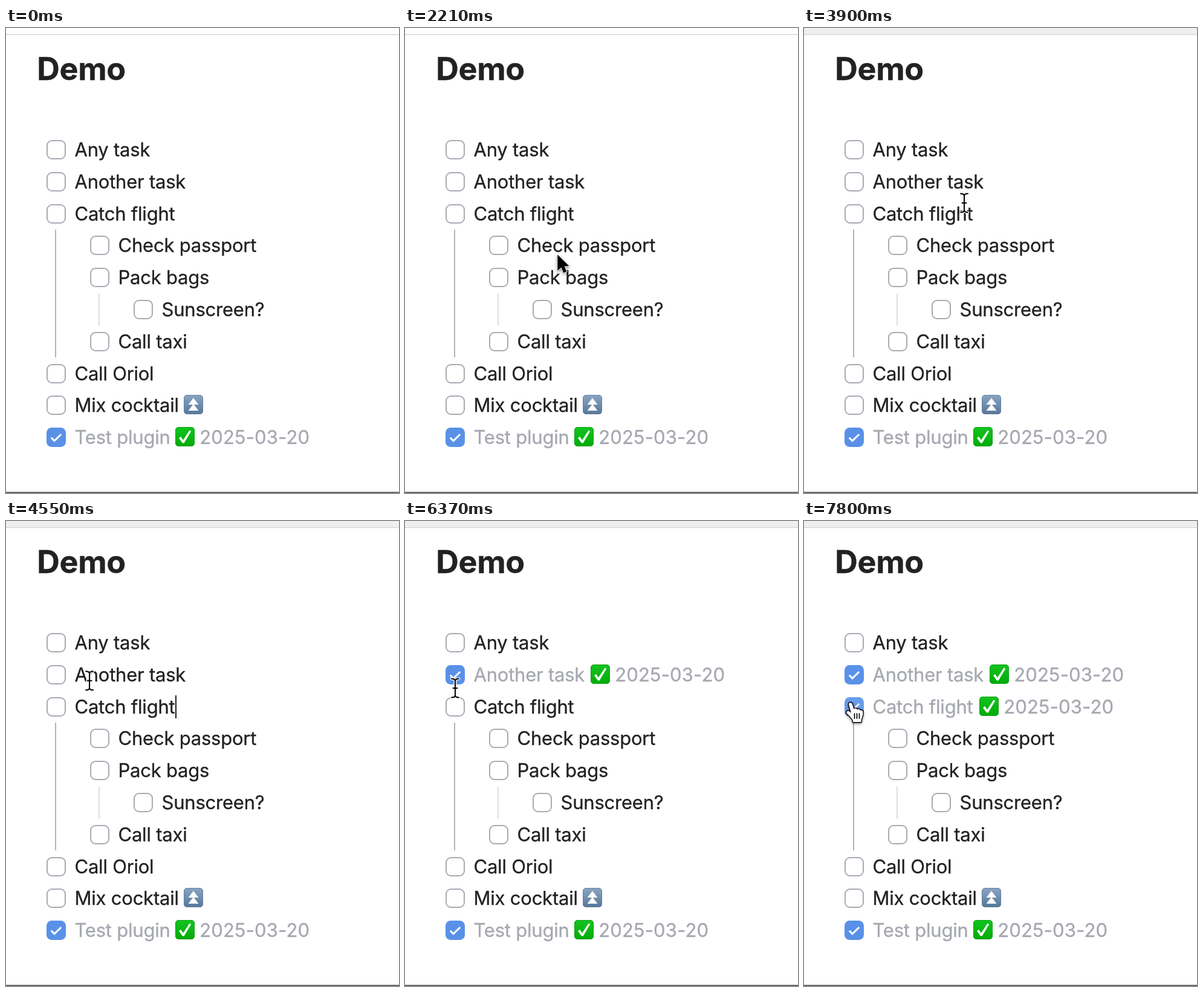
These frames come from a looping animation (650 px wide and 768 px high, 8000 ms). An HTML page with a canvas:

```html
<!DOCTYPE html>
<html lang="en">
<head>
<meta charset="utf-8">
<title>Demo</title>
<style>
  html, body { margin: 0; width: 100%; height: 100%; overflow: hidden; background: #fff; }
  canvas { display: block; width: 650px; height: 768px; }
</style>
</head>
<body>
<canvas id="stage" width="650" height="768"></canvas>
<script>
const ctx = document.getElementById('stage').getContext('2d');
const LOOP = 8000, STEP = 130;
const FONT = 'Inter, "Liberation Sans", sans-serif';
const INK = '#222222', MUTED = '#a6a8b1', EDGE = '#a9abb4', EDGE_HOVER = '#5c5c5c';
const BLUE = '#5991e8', BLUE_HOVER = '#689ceb';
const FOCUS_AT = 3380, DATE = '2025-03-20';

// icon: x of the emoji that follows the label; done: time of completion
const tasks = [
  { text: 'Any task', level: 0 },
  { text: 'Another task', level: 0, done: 5850, icon: 307 },
  { text: 'Catch flight', level: 0, done: 6890, icon: 290 },
  { text: 'Check passport', level: 1 },
  { text: 'Pack bags', level: 1 },
  { text: 'Sunscreen?', level: 2 },
  { text: 'Call taxi', level: 1 },
  { text: 'Call Oriol', level: 0 },
  { text: 'Mix cocktail', level: 0, urgent: 294 },
  { text: 'Test plugin', level: 0, done: 0, icon: 280 }
];
tasks.forEach((task, i) => {
  task.x = 67 + 72 * task.level;
  task.y = Math.round(185 + 52.8 * i);
});

// time, x, y of the pointer hot spot
const path = [
  [1300, 192, 428], [1560, 209, 396], [2080, 246, 372], [2730, 297, 379],
  [3380, 268, 296], [3770, 268, 296], [3900, 265, 289], [4160, 284, 303],
  [4290, 284, 303], [4680, 87, 250], [6110, 87, 250], [6370, 83, 276],
  [6630, 77, 300], [8000, 77, 300]
];

const caretSpans = [[4290, 4940], [5460, 6110], [6630, 6890]];

const handShape = new Path2D('M5 4C5 0 10.5 0 11 4L13.5 12C14 10 18.5 10 19 13C20 11 23.5 11.5 24 14' +
  'C25.5 12.5 28.5 14 28.5 17C28.8 22 27 25 26 28L25.5 33L12 33L11.5 29.5C9 26 6 22.5 2 19' +
  'C0 16.5 3 13.5 6 15.5L9 18Z');
const handLines = new Path2D('M14.5 19V27M18.5 19V27M22.5 19V27');
const arrowShape = new Path2D('M1 1.5V28L7.2 22.4L11 31.5L16 29.4L12.2 20.8L20 20.3Z');
const beamShape = new Path2D('M-6-15.5C-3-15.5 0-14.5 0-11.5C0-14.5 3-15.5 6-15.5' +
  'M0-12V12M-6 15.5C-3 15.5 0 14.5 0 11.5C0 14.5 3 15.5 6 15.5M-3.5 0H3.5');
const tickShape = new Path2D('M6 18.2L9 15.8L13 21.4L23.6 5.4L26.2 7L14.6 26.6H12Z');

function pointerAt(t) {
  if (t < path[0][0]) return null;
  const i = path.findIndex(k => k[0] > t);
  const a = path[i - 1], b = path[i];
  const p = (t - a[0]) / (b[0] - a[0]);
  const e = p * p * (3 - 2 * p);
  return { x: a[1] + (b[1] - a[1]) * e, y: a[2] + (b[2] - a[2]) * e };
}

// A hairline stroke gives the slightly heavier screen weight
function write(text, x, baseline, color, { size = 31, weight = 400, spacing = -0.22 } = {}) {
  ctx.font = `${weight} ${size}px ${FONT}`;
  ctx.letterSpacing = spacing + 'px';
  ctx.fillStyle = ctx.strokeStyle = color;
  ctx.lineWidth = 0.35;
  ctx.fillText(text, x, baseline);
  ctx.strokeText(text, x, baseline);
}

function rect(x, y, w, h, color) {
  ctx.fillStyle = color;
  ctx.fillRect(x, y, w, h);
}

function rounded(x, y, w, h, r) {
  ctx.beginPath();
  ctx.roundRect(x, y, w, h, r);
}

function line(points, width, color) {
  ctx.beginPath();
  points.forEach(([x, y]) => ctx.lineTo(x, y));
  ctx.lineWidth = width;
  ctx.strokeStyle = color;
  ctx.stroke();
}

function tile(x, y, top, bottom, edge) {
  const g = ctx.createLinearGradient(0, y, 0, y + 32);
  g.addColorStop(0, top);
  g.addColorStop(1, bottom);
  rounded(x + 0.5, y + 0.5, 31, 31, 4.5);
  ctx.fillStyle = g;
  ctx.fill();
  ctx.lineWidth = 1;
  ctx.strokeStyle = edge;
  ctx.stroke();
}

function doneIcon(x, y) {
  tile(x, y, '#14c41f', '#00ab08', '#0da017');
  ctx.save();
  ctx.translate(x, y);
  ctx.fillStyle = '#fff';
  ctx.fill(tickShape);
  ctx.restore();
}

function urgentIcon(x, y) {
  tile(x, y, '#8ba5c2', '#56779b', '#64809f');
  ctx.fillStyle = '#fff';
  for (const top of [5, 15]) {
    ctx.beginPath();
    ctx.moveTo(x + 16, y + top);
    ctx.lineTo(x + 24.5, y + top + 11);
    ctx.lineTo(x + 7.5, y + top + 11);
    ctx.fill();
  }
}

function checkbox(x, y, done, hover) {
  if (done) {
    rounded(x, y, 32, 32, 8.5);
    ctx.fillStyle = hover ? BLUE_HOVER : BLUE;
    ctx.fill();
    line([[x + 7.8, y + 16.6], [x + 13, y + 21.8], [x + 24.2, y + 11]], 3, '#fff');
  } else {
    rounded(x + 1, y + 1, 30, 30, 8);
    ctx.lineWidth = 2;
    ctx.strokeStyle = hover ? EDGE_HOVER : EDGE;
    ctx.stroke();
  }
}

function outlined(shape, inner, outer, width) {
  ctx.strokeStyle = outer;
  ctx.lineWidth = width;
  ctx.stroke(shape);
  ctx.fillStyle = inner;
  ctx.fill(shape);
}

function drawPointer(p, kind) {
  ctx.save();
  ctx.lineJoin = ctx.lineCap = 'round';
  if (kind === 'beam') {
    ctx.translate(p.x, p.y);
    for (const [width, color] of [[4.5, '#fff'], [2, '#000']]) {
      ctx.lineWidth = width;
      ctx.strokeStyle = color;
      ctx.stroke(beamShape);
    }
  } else {
    ctx.shadowColor = 'rgba(0,0,0,.3)';
    ctx.shadowBlur = 4;
    ctx.shadowOffsetY = 2;
    if (kind === 'hand') {
      ctx.translate(p.x - 8, p.y - 1);
      outlined(handShape, '#fff', '#000', 2.8);
      ctx.shadowColor = 'transparent';
      ctx.lineWidth = 1.7;
      ctx.stroke(handLines);
    } else {
      ctx.translate(p.x, p.y);
      outlined(arrowShape, '#fff', '#fff', 2.4);
      ctx.shadowColor = 'transparent';
      ctx.fillStyle = '#000';
      ctx.fill(arrowShape);
    }
  }
  ctx.restore();
}

function draw(t) {
  rect(0, 0, 650, 768, '#fff');
  if (t >= FOCUS_AT) rect(0, 0, 650, 10, '#efefef');
  rect(0, 10, 650, 1.5, '#d8d8d8');
  rect(0, 766, 650, 2, '#6c6c6c');
  write('Demo', 51.3, 86, INK, { size: 52, weight: 700, spacing: -0.35 });

  rect(81, 333, 2, 211, '#b3b3b3');
  rect(153, 439, 2, 53, '#dfdfdf');

  const p = pointerAt(t);
  const over = p && t >= FOCUS_AT && tasks.find(({ x, y }) =>
    p.x >= x && p.x <= x + 32 && p.y >= y && p.y <= y + 32);

  for (const task of tasks) {
    const { x, y } = task;
    const done = t >= task.done;
    const baseline = y + 27;
    checkbox(x, y, done, task === over);
    write(task.text, x + 46.5, baseline, done ? MUTED : INK);
    if (done) {
      doneIcon(task.icon, y - 1);
      write(DATE, task.icon + 40.3, baseline, MUTED, { spacing: 0.15 });
    }
    if (task.urgent) urgentIcon(task.urgent, y - 1);
  }

  if (caretSpans.some(([on, off]) => t >= on && t < off)) rect(280, 288, 2, 38, INK);
  if (p) drawPointer(p, t < FOCUS_AT ? 'arrow' : over ? 'hand' : 'beam');
}

function tick() {
  const t = performance.now() % LOOP;
  draw(Math.floor(t / STEP) * STEP);
  requestAnimationFrame(tick);
}
tick();
</script>
</body>
</html>
```
